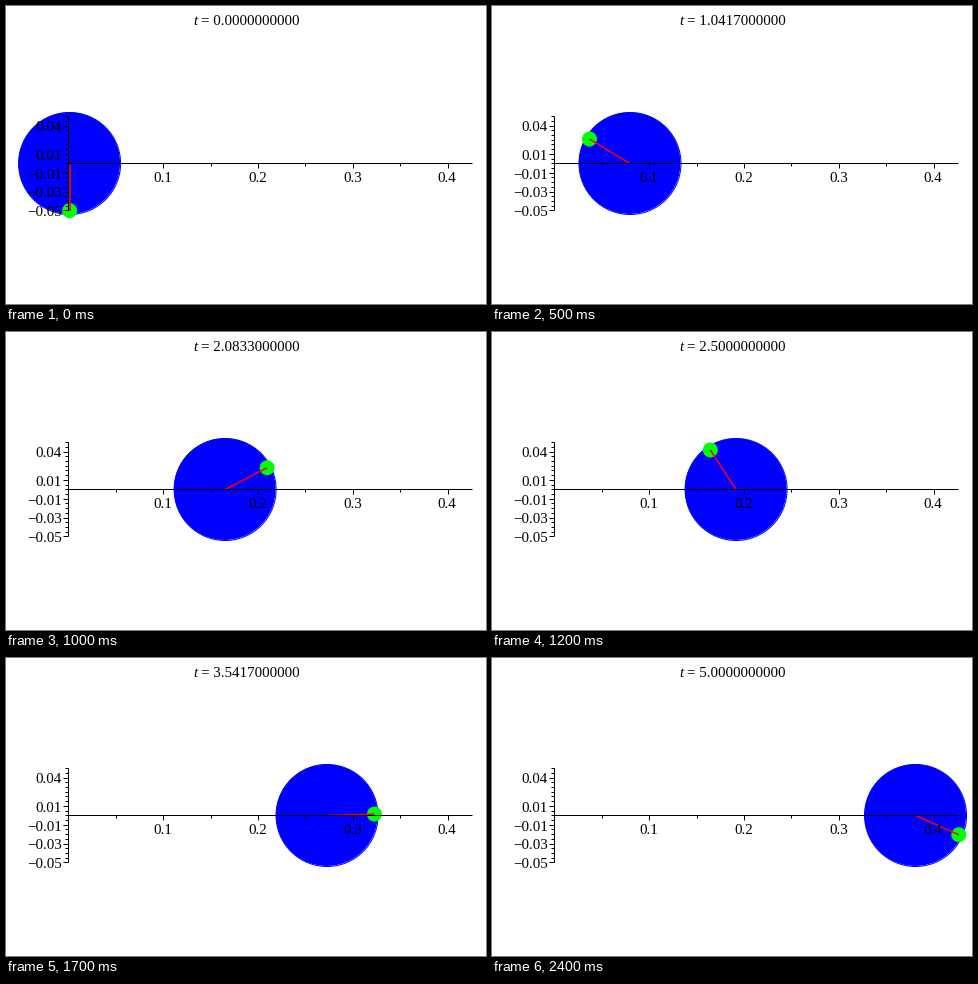
A matplotlib script that plays this animation: 480x298 px, repeating every 2.5 s.

```python
import numpy as np
import matplotlib.pyplot as plt
from matplotlib.animation import FuncAnimation
from matplotlib.patches import Circle

W, H, DPI = 480, 298, 100
FRAMES, T_END = 25, 5.0
PT = 72 / DPI                 # points per pixel
X0, Y0 = 62.3, 157.3          # origin of the axes in pixels
UX, UY = 948.0, 942.0         # pixels per unit
OMEGA, ARM = 4.0, 0.05

plt.rcParams["font.family"] = "Liberation Serif"
fig = plt.figure(figsize=(W / DPI, H / DPI), dpi=DPI, facecolor="white")
ax = fig.add_axes([0, 0, 1, 1])
ax.set(xlim=(0, W), ylim=(H, 0))
ax.axis("off")


def px(x):
    return X0 + UX * x


def py(y):
    return Y0 - UY * y


def line(xs, ys, color="black", width=1.0, z=10):
    return ax.plot(xs, ys, color=color, lw=width * PT, zorder=z,
                   solid_capstyle="butt")[0]


def label(x, y, s, **kw):
    return ax.text(x, y, s, fontsize=15 * PT, va="baseline", zorder=11, **kw)


def draw_axes():
    line([X0, 466], [Y0, Y0])
    line([X0, X0], [py(0.05), py(-0.05)])
    for k in range(1, 9):
        x = px(0.05 * k)
        line([x, x], [Y0, Y0 + (3 if k % 2 else 5)])
        if k % 2 == 0:
            label(x - 0.3, 176, f"{0.05 * k:.1f}", ha="center")
    named = (0.04, 0.01, -0.01, -0.03, -0.05)
    for y in 0.005 * np.arange(-10, 11):
        tick = 5 if np.isclose(y, named).any() else 3
        line([X0 - tick, X0], [py(y), py(y)])
    for y in named:
        label(56, py(y) + 5.8, f"{y:.2f}".replace("-", "\u2212"), ha="right")


def center(t):
    """Steady drift plus the wobble caused by the turning bead."""
    a = OMEGA * t
    return 0.0778 * t - 0.00438 * np.sin(a) - 0.00712 * np.sin(2 * a)


draw_axes()
label(187.2, 19, "t", style="italic")
title = label(194.9, 19, "")
disc = ax.add_patch(Circle((0, 0), 50.8, fc="blue", ec="none", zorder=1))
rim = ax.add_patch(Circle((0, 0), 51, fill=False, ec="blue", lw=PT, zorder=2))
bead = ax.add_patch(Circle((0, 0), 7.5, fc="lime", ec="none", zorder=3))
rod = line([], [], "red", 1.5, 4)


def update(i):
    t = T_END * i / (FRAMES - 1)
    cx, cy = px(center(t)) + 1.3, Y0 + 0.2
    bx = cx + UX * ARM * np.sin(OMEGA * t)
    by = cy + UY * ARM * np.cos(OMEGA * t)
    disc.center = cx - 0.35, cy - 0.35
    rim.center = cx, cy
    bead.center = bx, by
    rod.set_data([cx, bx], [cy, by])
    title.set_text(f"= {float(f'{t:.5g}'):.10f}")
    return disc, rim, bead, rod, title


anim = FuncAnimation(fig, update, frames=FRAMES, interval=100,
                     repeat=True, repeat_delay=0, blit=False)
plt.show()
```
